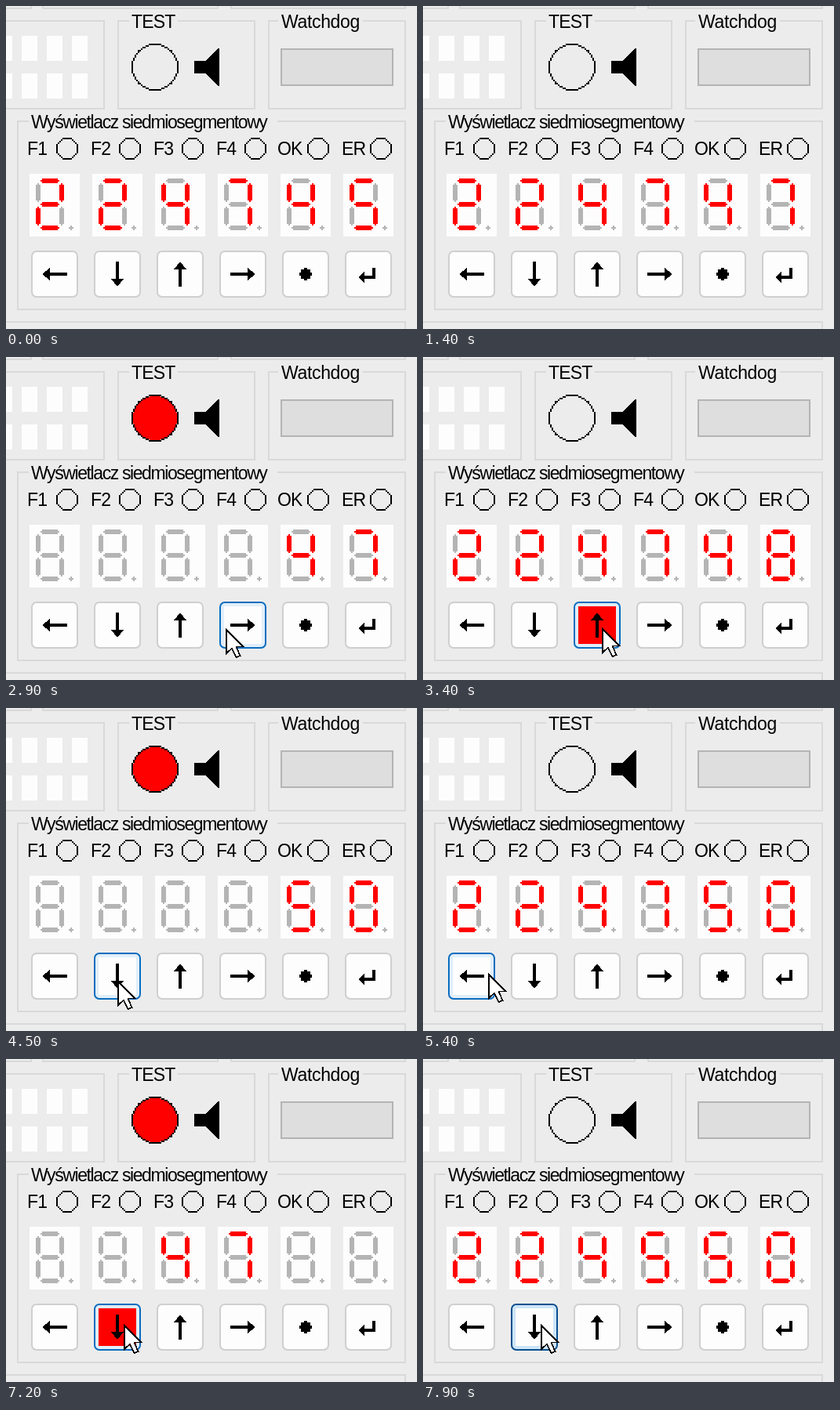
Recreate the animation shown at these times as an HTML page. Size 524 by 412 pixels, loop 8000 ms.

```html
<!DOCTYPE html>
<html lang="pl">
<head>
<meta charset="utf-8">
<title>Wyświetlacz siedmiosegmentowy</title>
<style>
  html, body { margin: 0; width: 100%; height: 100%; overflow: hidden; background: #ececec; }
  svg { display: block; shape-rendering: crispEdges; }
  text { font: 23px "Liberation Sans", Arial, sans-serif; fill: #000; }
  .title { letter-spacing: -1.4px; }
  .caption { letter-spacing: -.35px; }
  .tight { letter-spacing: -.8px; }
  .group { fill: none; stroke: #d9d9d9; stroke-width: 2; }
  .gap { fill: #ececec; }
  .panel { fill: #fdfdfd; }
  .seg { fill: #b4b4b4; }
  .seg.on { fill: #f00; }
  .key { fill: #fdfdfd; stroke: #cfcfcf; stroke-width: 2; shape-rendering: auto; }
  .key.focus { fill: #e0eef9; stroke: #0a6cbf; }
  .key.down { fill: #cce4f7; stroke: #0a4f8f; }
  .face { fill: #fdfdfd; }
  .face.on { fill: #f00; }
</style>
</head>
<body>
<svg id="stage" width="524" height="412" viewBox="0 0 524 412"></svg>
<script>
const stage = document.getElementById('stage');
const LOOP = 8000, STEP = 100;

function add(tag, attrs, text) {
  const node = document.createElementNS('http://www.w3.org/2000/svg', tag);
  for (const name in attrs) node.setAttribute(name, attrs[name]);
  if (text) node.textContent = text;
  return stage.appendChild(node);
}
const rect = (x, y, width, height, cls) => add('rect', { x, y, width, height, class: cls });
const path = (d, attrs) => add('path', { d, ...attrs });
const label = (x, y, text, cls) => add('text', { x, y, class: cls }, text);

function group(x, y, w, h, gapX, gapW) {
  rect(x, y, w, h, 'group');
  if (gapW) rect(gapX, y - 2, gapW, 4, 'gap');
}

// Ring of 2 px blocks, drawn octant by octant
function ring(cx, cy, blocks) {
  const r = blocks / 2 - .5;
  let d = '';
  for (let x = blocks % 2 ? 0 : .5; x <= r * .75; x++) {
    const y = Math.round(Math.sqrt(r * r - x * x) - .5) + .5;
    if (x > y) break;
    for (const [a, b] of [[x, y], [y, x]])
      for (const sx of [-1, 1])
        for (const sy of [-1, 1])
          d += `M${cx + 2 * a * sx - 1} ${cy + 2 * b * sy - 1}h2v2h-2z`;
  }
  path(d);
}

// Panels and captions
group(-10, -20, 42, 23);
group(47, -20, 223, 23);
group(287, -20, 222, 23);
group(-10, 19, 135, 112);
group(143, 19, 174, 112, 157, 62);
group(335, 19, 174, 112, 347, 108);
group(15, 147, 494, 240, 29, 317);
group(-10, 403, 519, 30);
for (const y of [38, 86])
  for (let x = -12; x < 100; x += 32) rect(x, y, 20, 32, 'panel');
label(160, 28, 'TEST', 'tight');
label(351, 28, 'Watchdog', 'caption');
label(32, 156, 'Wyświetlacz siedmiosegmentowy', 'title');

const testLamp = add('circle', { cx: 190, cy: 78, r: 28.5 });
ring(190, 78, 30);
path('M240 70h14l16-16h2v48h-2l-16-16h-14z');
add('rect', { x: 351, y: 55, width: 142, height: 46, fill: '#dedede', stroke: '#b4b4b4', 'stroke-width': 2 });

['F1', 'F2', 'F3', 'F4', 'OK', 'ER'].forEach((name, i) => {
  label([27, 108, 188, 268, 346, 428][i], 190, name, 'tight');
  ring(78 + 80 * i, 182, 14);
});

// Seven-segment digits, segments in the order a to g
const flat = (x, y) => `M${x} ${y + 2}h2v-2h20v2h2v2h-2v2h-20v-2h-2z`;
const tall = (x, y) => `M${x + 2} ${y}v2h-2v20h2v2h2v-2h2v-20h-2v-2z`;
const GLYPHS = ['abcdef', 'bc', 'abdeg', 'abcdg', 'bcfg', 'acdfg', 'acdefg', 'abc', 'abcdefg', 'abcdfg'];

const digits = Array.from({ length: 6 }, (_, i) => {
  const x = 38 + 80 * i;
  rect(x - 8, 214, 64, 80, 'panel');
  path(`M${x + 44} 280h2v2h2v2h-2v2h-2v-2h-2v-2h2z`, { class: 'seg' });
  return [
    flat(x + 6, 220), tall(x + 30, 226), tall(x + 30, 256), flat(x + 6, 280),
    tall(x, 256), tall(x, 226), flat(x + 6, 250)
  ].map(d => path(d, { class: 'seg' }));
});

// Buttons
const arrow = 'M-16 0l10-8v6h22v4h-22v6z';
const icons = [
  [arrow, 0], [arrow, -90], [arrow, 90], [arrow, 180],
  ['M-2-8h4v2h4v4h2v4h-2v4h-4v2h-4v-2h-4v-4h-2v-4h2v-4h4z', 0],
  ['M-13 4l8-8v6h10v-10h4v14h-14v6z', 0]
];
const keys = icons.map(([d, turn], i) => {
  const x = 32 + 80 * i;
  const frame = add('rect', { x: x + 1, y: 313, width: 58, height: 58, rx: 6, class: 'key' });
  const face = rect(x + 6, 318, 48, 48, 'face');
  path(d, { transform: `translate(${x + 30} 342) rotate(${turn})` });
  return { frame, face };
});

const cursor = path('M1 2V32L8 25.5L13.5 37L18.5 35L13.5 23.5H22.5z',
  { fill: '#fff', stroke: '#000', 'stroke-width': 1.7 });

// Time line
const LEFT = 0, DOWN = 1, UP = 2, RIGHT = 3;
const presses = [
  [2100, 2300, RIGHT],
  [3400, 3500, UP], [3600, 3700, UP], [3800, 3900, UP], [4000, 4100, UP],
  [4300, 4500, DOWN], [5200, 5400, LEFT],
  [7200, 7400, DOWN], [7600, 7800, DOWN], [8000, 8100, DOWN]
];
const seconds = [[0, 45], [300, 46], [1300, 47], [3400, 48], [3600, 49], [3800, 50], [4000, 51], [4300, 50]];
const minutes = [[0, 47], [7300, 46], [7700, 45]];
const route = [
  [1500, 469, 199], [2000, 306, 338], [2100, 308, 347], [2700, 308, 347],
  [3200, 228, 345], [4050, 228, 345], [4250, 142, 347], [4600, 142, 347],
  [5100, 83, 338], [6100, 83, 338], [6800, 150, 338], [LOOP, 150, 338]
];

const latest = (list, t) => list.filter(entry => entry[0] <= t).pop();

function place(t) {
  const next = route.findIndex(point => point[0] > t);
  if (next < 1) return null;
  const [t0, x0, y0] = route[next - 1], [t1, x1, y1] = route[next];
  const u = (t - t0) / (t1 - t0), k = u * u * (3 - 2 * u);
  return [x0 + (x1 - x0) * k, y0 + (y1 - y0) * k].map(Math.round);
}

function render(t) {
  const lit = (t + 1700) % 2000 < 1000;
  testLamp.style.fill = lit ? '#f00' : 'none';

  // While editing, only the selected pair stays lit in each blink.
  const blink = t >= 2400 && (t + 1600) % 2000 < 1000;
  const pair = t < 5200 ? 2 : 1;
  const shown = '22' + latest(minutes, t)[1] + latest(seconds, t)[1];
  digits.forEach((segments, i) => {
    const visible = !blink || i >> 1 === pair;
    segments.forEach((seg, s) =>
      seg.classList.toggle('on', visible && GLYPHS[shown[i]].includes('abcdefg'[s])));
  });

  // A button takes the focus one step before its face lights up.
  const press = presses.filter(([from]) => from - STEP <= t).pop();
  keys.forEach(({ frame, face }, i) => {
    const focused = !!press && press[2] === i;
    frame.classList.toggle('focus', focused);
    frame.classList.toggle('down', focused && t < press[0]);
    face.classList.toggle('on', focused && t >= press[0] && t < press[1]);
  });

  const spot = place(t);
  cursor.style.visibility = spot ? 'visible' : 'hidden';
  if (spot) cursor.setAttribute('transform', `translate(${spot})`);
}

const start = performance.now();
function tick(now) {
  const t = Math.max(0, now - start) % LOOP;
  render(Math.floor(t / STEP) * STEP);
  requestAnimationFrame(tick);
}
render(0);
requestAnimationFrame(tick);
</script>
</body>
</html>
```
